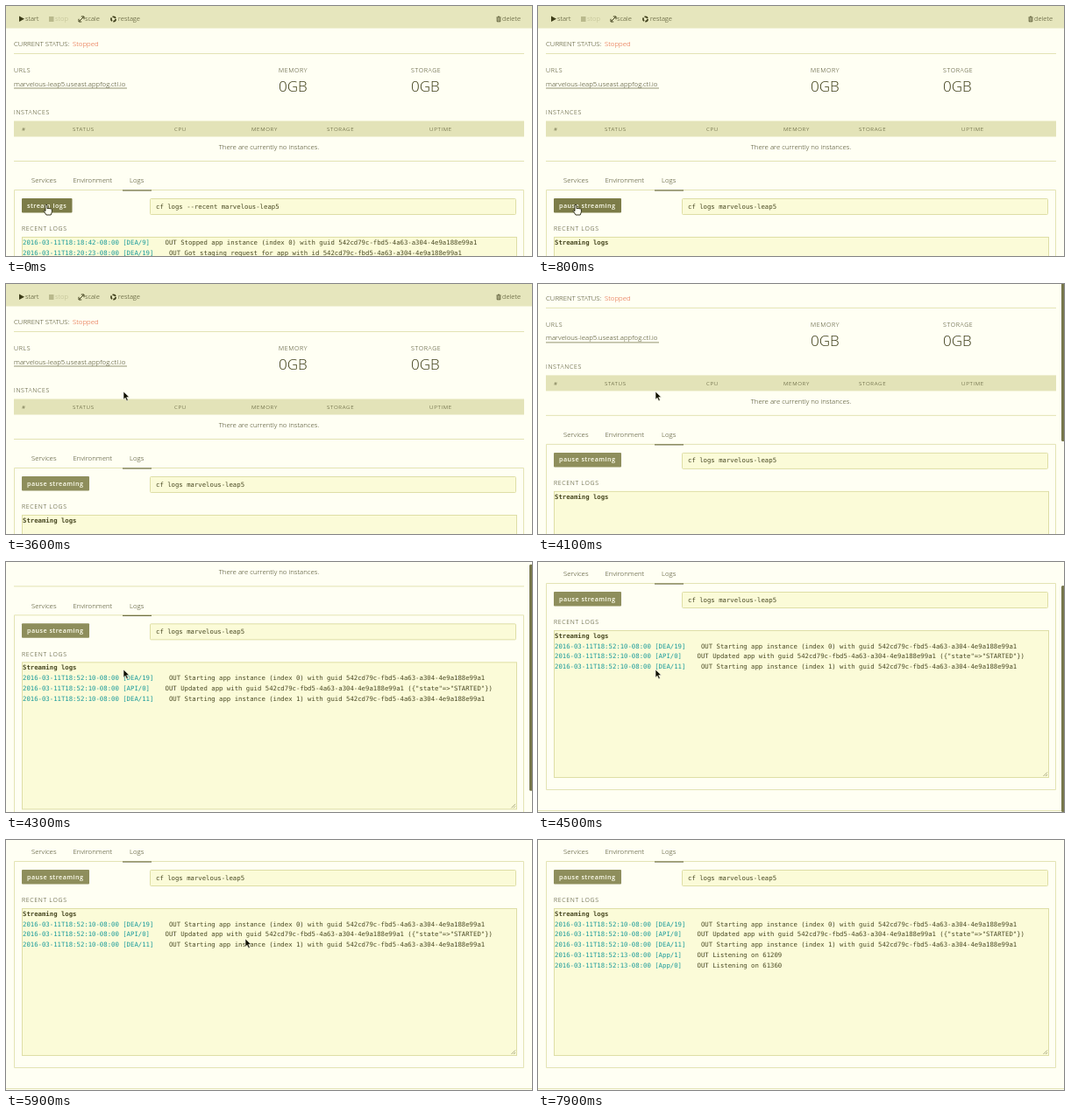
Animation of 600x286 px, one loop 8 s. Source, as an HTML page:

```html
<!DOCTYPE html>
<html lang="en">
<head>
<meta charset="utf-8">
<title>App logs</title>
<style>
html, body { margin: 0; width: 600px; height: 286px; overflow: hidden; background: #fffff3; }
svg { display: block; }
text { font: 300 7.8px "Open Sans", sans-serif; fill: #3c3c18; white-space: pre; }
.bar { font-size: 7.5px; }
.head { font-size: 7px; letter-spacing: .65px; }
.col { font-size: 6.2px; letter-spacing: .7px; }
.big { font-size: 17px; }
.btn { font-size: 7.2px; font-weight: 600; letter-spacing: .45px; fill: #fffff0; }
.mono { font: 400 7.3px "DejaVu Sans Mono", monospace; fill: #4a4a24; }
.bold { font-weight: 700; }
.time { fill: #16999a; }
.line { stroke: #e3e3b4; fill: none; }
.field { fill: #fbfbd8; stroke: #dedea6; }
</style>
</head>
<body>
<svg width="600" height="286" viewBox="0 0 600 286">
  <g id="page">
    <rect width="600" height="25.5" fill="#e6e6bd"/>
    <g id="start">
      <rect id="startBg" x="9" y="4" width="34" height="21.5" fill="#37370c"/>
      <path d="M15 11.5l6 3.3l-6 3.3z"/>
    </g>
    <path d="M49 12h5.5v6h-5.5z" fill="#b9b98c"/>
    <path d="M83.5 17.5l5-5M85.8 12h3.2v3.2M83 14.8v3.2h3.2" stroke="#3c3c18" fill="none"/>
    <circle cx="122.5" cy="15" r="2.6" fill="none" stroke="#3c3c18" stroke-width="1.6" stroke-dasharray="4.2 1.25"/>
    <path d="M559.5 13h5M561 12.2h2M560.2 13.5v4.3h3.6v-4.3M562 14v3" stroke="#3c3c18" stroke-width=".8" fill="none"/>
    <path class="line" d="M9 54.5H591M9 177.5H591M9.5 210.5H590.5V446.5H9.5zM0 470.5H600"/>
    <rect x="9" y="131.5" width="582" height="18" fill="#e3e3b8"/>
    <path d="M133 211H166" stroke="#55552a"/>
    <path d="M9 94H138" stroke="#66663c" stroke-width=".7"/>
    <rect id="button" x="18" y="220" height="16.5" rx="1"/>
    <rect class="field" x="164.5" y="220.5" width="417" height="18" rx="1"/>
    <rect class="field" x="18.5" y="264.5" width="564" height="168"/>
    <path d="M576.5 431l4.5-4.5M579 431l2-2" stroke="#8a8a60" stroke-width=".7"/>
    <g id="labels"></g>
    <g id="recent"></g>
    <g id="stream"></g>
    <g id="begun"></g>
    <g id="listen"></g>
  </g>
  <rect id="thumb" x="597" width="3.5" height="259" rx="1.5" fill="#77774c"/>
  <path id="arrow" d="M0 0v9.2l2.1-2l1.6 3.6l1.6-.7l-1.6-3.5h3z" fill="#111100" stroke="#fffff3" stroke-width=".6"/>
  <path id="hand" d="M-1 .8q1-1.5 2 0v4q1-1 2 0q1-.8 1.8.2q1.2-.5 1.6.7v3l-1.2 3.3h-5.2l-3-4.6q.2-1.5 2 .2z" fill="#fffff3" stroke="#22220a" stroke-width=".9"/>
</svg>
<script>
const $ = id => document.getElementById(id);
const add = (id, html) => $(id).insertAdjacentHTML('beforeend', html);
const text = (id, x, y, s, cls = '', extra = '') =>
  add(id, `<text x="${x}" y="${y}" class="${cls}" ${extra}>${s}</text>`);
const log = (id, row, stamp, s) => text(id, 19, 272.8 + row * 11.8,
  `<tspan class="time">2016-03-11T${stamp}</tspan>    OUT ${s}`, 'mono');

const guid = '542cd79c-fbd5-4a63-a304-4e9a188e99a1';
text('start', 22, 17.3, 'start', 'bar');
for (const [x, s, extra] of [[56, 'stop', 'style="fill:#b9b98c"'], [90, 'scale'], [128, 'restage'], [566, 'delete']])
  text('labels', x, 17.3, s, 'bar', extra);
text('labels', 9, 46, 'CURRENT STATUS:');
text('labels', 76, 46, 'Stopped', '', 'style="fill:#e2562c"');
for (const [x, y, s] of [[9, 76, 'URLS'], [311, 76, 'MEMORY'], [462, 76, 'STORAGE'], [9, 124.3, 'INSTANCES'], [18, 257.3, 'RECENT LOGS']])
  text('labels', x, y, s, 'head');
text('labels', 9, 91.5, 'marvelous-leap5.useast.appfog.ctl.io');
for (const x of [311, 462]) text('labels', x, 98, '0GB', 'big');
for (const [x, s] of [[18, '#'], [76, 'STATUS'], [192, 'CPU'], [280, 'MEMORY'], [366, 'STORAGE'], [483, 'UPTIME']])
  text('labels', x, 143, s, 'col');
text('labels', 300, 164, 'There are currently no instances.', '', 'text-anchor="middle"');
for (const [x, s] of [[29, 'Services'], [76.5, 'Environment'], [141, 'Logs']]) text('labels', x, 202.3, s);

text('recent', 24, 230.6, 'stream logs', 'btn');
text('recent', 171, 231.5, 'cf logs --recent marvelous-leap5', 'mono');
log('recent', 0, '18:18:42-08:00 [DEA/9]', `Stopped app instance (index 0) with guid ${guid}`);
log('recent', 1, '18:20:23-08:00 [DEA/19]', `Got staging request for app with id ${guid}`);

text('stream', 24, 230.6, 'pause streaming', 'btn');
text('stream', 171, 231.5, 'cf logs marvelous-leap5', 'mono');
text('stream', 19, 272.8, 'Streaming logs', 'mono bold');
log('begun', 1, '18:52:10-08:00 [DEA/19]', `Starting app instance (index 0) with guid ${guid}`);
log('begun', 2, '18:52:10-08:00 [API/0]', `Updated app with guid ${guid} ({"state"=&gt;"STARTED"})`);
log('begun', 3, '18:52:10-08:00 [DEA/11]', `Starting app instance (index 1) with guid ${guid}`);
log('listen', 4, '18:52:13-08:00 [App/1]', 'Listening on 61209');
log('listen', 5, '18:52:13-08:00 [App/0]', 'Listening on 61360');

// Pointer stops: time, x, y
const stops = [[0, 46, 227], [800, 43, 227], [1300, 43, 227], [2100, 26, 23.5], [2800, 26, 23.5],
  [3500, 134, 123], [4800, 134, 123], [5600, 273, 113], [6300, 273, 113], [6900, 330, 300], [8000, 330, 300]];
const clamp = v => Math.max(0, Math.min(1, v));
const ease = v => { v = clamp(v); return v * v * (3 - 2 * v); };
const show = (id, on) => $(id).setAttribute('visibility', on ? 'visible' : 'hidden');
const move = (id, x, y) => $(id).setAttribute('transform', `translate(${x} ${y})`);

function pointer(t) {
  const i = stops.findIndex(s => s[0] > t);
  const [a, ax, ay] = stops[i - 1], [b, bx, by] = stops[i];
  const k = ease((t - a) / (b - a));
  return [ax + (bx - ax) * k, ay + (by - ay) * k];
}

function draw(t) {
  const streaming = t >= 400;
  const scroll = 186 * ease((t - 4000) / 420);
  const [x, y] = pointer(t);
  const width = streaming ? 77 : 57.5;
  const overButton = scroll === 0 && x > 18 && x < 18 + width && y > 220 && y < 237;
  const overStart = scroll === 0 && x > 9 && x < 43 && y > 4 && y < 25.5;

  move('page', 0, -scroll);
  show('recent', !streaming);
  show('stream', streaming);
  show('begun', t >= 4300);
  show('listen', t >= 7300);
  $('button').setAttribute('width', width);
  $('button').setAttribute('fill', overButton ? '#7c7c48' : '#8e8e5c');
  show('startBg', overStart);
  for (const el of $('start').querySelectorAll('path, text')) el.style.fill = overStart ? '#fffff0' : '#3c3c18';

  move('thumb', 0, -97 + scroll * 2 / 3);
  $('thumb').setAttribute('opacity', t < 3950 ? 0 : clamp((5100 - t) / 300));
  const hand = overButton || overStart;
  show('hand', hand);
  show('arrow', !hand);
  move(hand ? 'hand' : 'arrow', x, y);
}

const began = performance.now();
(function tick() {
  draw((performance.now() - began) % 8000);
  requestAnimationFrame(tick);
})();
</script>
</body>
</html>
```
